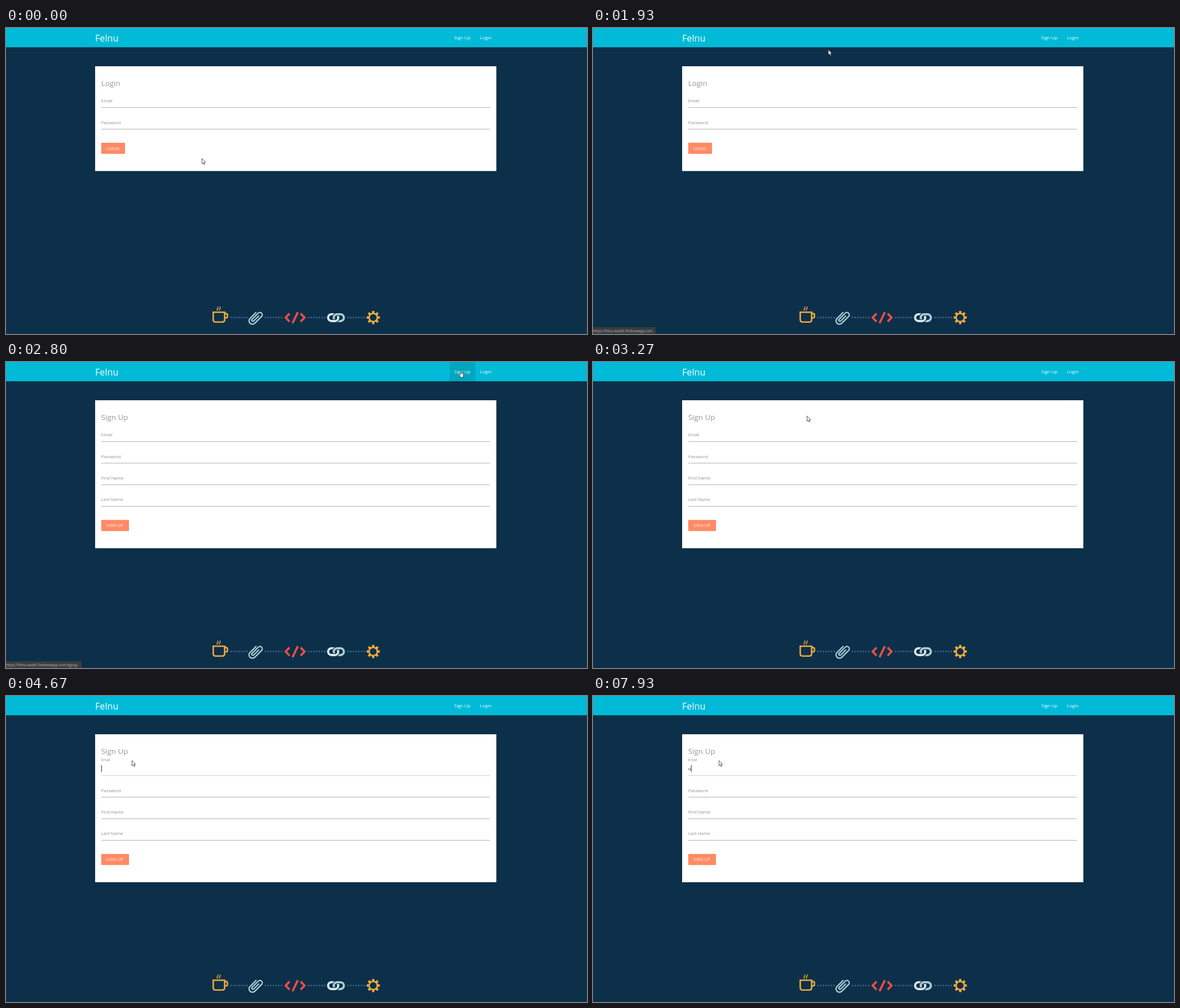
An HTML page that plays this animation: 1030 by 544 pixels, repeating every 8 s.

```html
<!DOCTYPE html>
<html lang="en">
<head>
<meta charset="utf-8">
<title>Felnu</title>
<style>
  html, body { margin: 0; width: 100%; height: 100%; overflow: hidden; background: #0c304a; }
  svg { display: block; width: 100vw; height: 100vh; font-family: "Open Sans", "Noto Sans", sans-serif; }
  .raised { filter: drop-shadow(0 .8px 1px rgba(0, 0, 0, .25)); }
  .nav { fill: #fff; font-size: 8px; font-weight: 500; }
  .title { fill: #979797; font-size: 13.4px; }
  .label { fill: #8f8f8f; font-size: 7.8px; }
  .btn { fill: #fff; font-size: 7.25px; font-weight: 500; letter-spacing: .27px; }
  .rule { stroke: #a6a6a6; stroke-width: .9; }
  .line { fill: none; stroke-width: 2.6; }
  .bold { stroke-width: 3.8; }
  .gap { stroke: #0c304a; stroke-width: 6.4; }
</style>
</head>
<body>
<svg viewBox="0 0 1030 544" preserveAspectRatio="none">
  <rect width="1030" height="544" fill="#0c304a"/>
  <rect class="raised" width="1030" height="34.3" fill="#00bad8"/>
  <rect id="hover" x="786.5" width="45.5" height="34.3" opacity="0"/>
  <text x="158" y="23.6" fill="#fff" font-size="16.2">Felnu</text>
  <text class="nav" x="794.8" y="20">Sign Up</text>
  <text class="nav" x="840.6" y="20">Login</text>

  <rect id="card" class="raised" x="158" y="68" width="711.3" fill="#fff"/>
  <text id="title" class="title" x="168.7" y="103.4"></text>
  <g id="fields"></g>
  <g id="button">
    <rect id="face" x="168.8" height="19.7" y="204" rx="1" fill="#ff8a65"/>
    <text id="action" class="btn" x="177.8" y="216.7"></text>
  </g>
  <text id="typed" x="168.7" y="132.2" font-size="7.9" fill="#222">u</text>
  <rect id="caret" y="123" width="1" height="12" fill="#222"/>

  <g id="dots" fill="#3f6389"></g>
  <g class="line" stroke="#f1aa3e">
    <path d="M367.4 505.3H387.6V518.5Q387.6 522.8 383.2 522.8H371.8Q367.4 522.8 367.4 518.5Z"/>
    <path d="M388 507.6H390Q392.6 507.6 392.6 510.4V512.4Q392.6 515.3 390 515.3H388"/>
    <path d="M375 502.5q-2-2 0-3.6t0-3.6M379 502.5q-2-2 0-3.6t0-3.6" style="stroke-width:1.4"/>
  </g>
  <path class="line" stroke="#a9d0d6" style="stroke-width:2.3" stroke-linecap="round" transform="translate(442.5 515) rotate(45)"
    d="M-6 -7V8A6 6 0 0 0 6 8V-9A4.2 4.2 0 0 0 -2.4 -9V6.4A2.1 2.1 0 0 0 1.8 6.4V-6"/>
  <path class="line bold" stroke="#ea4f46"
    d="M502.6 507.6L495.8 514.8L502.6 522M517.4 505.2L508 524.8M522.4 507.6L529.2 514.8L522.4 522"/>
  <g class="line bold">
    <rect x="571" y="508.8" width="18" height="12.2" rx="6.1" stroke="#dce8ee"/>
    <path class="gap" d="M581 514.9A6.1 6.1 0 0 1 587 508.8H590"/>
    <rect x="581" y="508.8" width="18" height="12.2" rx="6.1" stroke="#a9cdd6"/>
    <path class="gap" d="M589 514.9A6.1 6.1 0 0 1 583 521H580"/>
    <path d="M589 513.5V514.9A6.1 6.1 0 0 1 583 521H577" stroke="#dce8ee"/>
  </g>
  <g id="gear" transform="translate(651 514.7)" fill="#f1aa3e">
    <circle class="line" r="7.3" stroke="#f1aa3e"/>
  </g>

  <g id="status">
    <rect id="bar" y="532" height="12" fill="#3a3c3f"/>
    <text id="url" x="0" y="540.8" font-size="6.2" fill="#b4b6b8"></text>
  </g>

  <g id="pointer" stroke="#222" stroke-width=".75" stroke-linejoin="round" fill="#fff">
    <path id="arrow" d="M.3 .4V9.8L2.4 7.9L3.9 11.3L5.4 10.6L4 7.4H6.8Z"/>
    <path id="hand" d="M-.9 .9Q0 -.5 .9 .9V4.2L3.8 4.9Q4.7 5.3 4.6 6.5L3.8 9.6V11.5H-.9V10.2L-3 7.3Q-3.2 6 -2 6.1L-.9 7.1Z"/>
    <path id="beam" d="M-2 -4.3H2M0 -4.3V4.3M-2 4.3H2" stroke-width=".9"/>
  </g>
</svg>
<script>
const LOOP = 8000, STEP = 200 / 3, FADE = 270, BLINK = 1600 / 3;
const SWITCH = 2790, FOCUS = 3595, TYPED = 7925;
const HOST = "https://felnu-eade0.firebaseapp.com";
const ROW = 38.4;
const $ = id => document.getElementById(id);
const clamp = v => Math.max(0, Math.min(1, v));
const smooth = k => k * k * (3 - 2 * k);
const mix = (a, b, k) => a + (b - a) * k;
const set = (el, attrs) => { for (const k in attrs) el.setAttribute(k, attrs[k]); };
const show = (el, on) => set(el, { display: on ? "inline" : "none" });

function add(parent, tag, attrs, text = "") {
  const el = document.createElementNS("http://www.w3.org/2000/svg", tag);
  set(el, attrs);
  el.textContent = text;
  return $(parent).appendChild(el);
}

const rows = ["Email", "Password", "First Name", "Last Name"].map((name, i) => ({
  label: add("fields", "text", { class: "label", x: 168.8, y: 132.2 + ROW * i }, name),
  rule: add("fields", "path", { class: "rule", d: `M169 ${141.4 + ROW * i}H858` })
}));

for (const x of [399, 460, 536.5, 606.5])
  for (let i = 0; i < 7; i++) add("dots", "circle", { cx: x + 4.75 * i, cy: 514.8, r: 1.45 });
for (let i = 0; i < 8; i++)
  add("gear", "rect", { x: -2.1, y: -11.7, width: 4.2, height: 4, rx: .6, transform: `rotate(${45 * i})` });

// Where the mouse pauses or turns; it eases from stop to stop.
const stops = [
  { t: 0, x: 347, y: 231.5 },
  { t: 300, x: 219, y: 150 },
  { t: 750, x: 886, y: 52 },
  { t: 930, x: 794, y: 24 },
  { t: 1330, x: 105, y: 44 },
  { t: 1530, x: 182, y: 18 },
  { t: 1930, x: 416.5, y: 38 },
  { t: 2130, x: 817, y: 15 },
  { t: 2530, x: 806.5, y: 16 },
  { t: 2800, x: 806.5, y: 16 },
  { t: 3530, x: 199, y: 129 },
  { t: 3730, x: 199, y: 129 },
  { t: 4130, x: 223, y: 114.3 }
];

function pointerAt(t) {
  const i = stops.findIndex(s => s.t > t);
  if (i < 0) return stops[stops.length - 1];
  const a = stops[i - 1], b = stops[i];
  const k = smooth((t - a.t) / (b.t - a.t));
  return { x: mix(a.x, b.x, k), y: mix(a.y, b.y, k) };
}

function shapeAt({ x, y }, count) {
  const onLink = x > 786 && x < 869 || x > 158 && x < 198;
  if (y < 34 && onLink) return "hand";
  const row = (y - 118) / ROW;
  const onField = x > 169 && x < 858 && row >= 0 && row < count && row % 1 < .62;
  return onField ? "beam" : "arrow";
}

const pulse = (t, on, off) => Math.min(clamp((t - on) / FADE), clamp((off + FADE - t) / FADE));

function render(ms) {
  const t = Math.floor((ms + 5) / STEP) * STEP;
  const signup = t >= SWITCH, focused = t >= FOCUS, typed = t >= TYPED;
  const count = signup ? 4 : 2;
  const name = signup ? "Sign Up" : "Login";

  set($("card"), { height: 109.5 + ROW * count });
  $("title").textContent = name;
  $("action").textContent = name.toUpperCase();
  set($("face"), { width: signup ? 49.2 : 42.2 });
  set($("button"), { transform: `translate(0 ${ROW * (count - 2)})` });
  rows.forEach(({ label, rule }, i) => {
    show(label, i < count);
    show(rule, i < count);
  });

  const lift = 1 - (1 - clamp((t - FOCUS) / 220)) ** 2;
  const email = rows[0];
  set(email.label, { y: 132.2 - 15.9 * lift });
  email.label.style.fontSize = 7.8 - 1.5 * lift + "px";
  email.rule.style.stroke = focused ? "#c8c8c8" : "";

  show($("typed"), typed);
  show($("caret"), typed || focused && Math.floor((t - FOCUS) / BLINK) % 2 === 0);
  set($("caret"), { x: typed ? 173.7 : 168.8 });

  set($("hover"), { opacity: .11 * (pulse(t, 870, 900) + pulse(t, 2000, 2860)) });

  const onSignup = t >= 2060;
  show($("status"), t >= 1590 && t < 3060);
  $("url").textContent = HOST + (onSignup ? "/signup" : "");
  set($("bar"), { width: onSignup ? 134 : 111 });

  const at = pointerAt(t);
  const shape = shapeAt(at, count);
  for (const id of ["arrow", "hand", "beam"]) show($(id), id === shape);
  set($("pointer"), { transform: `translate(${at.x} ${at.y})` });
}

const start = performance.now();
function tick() {
  render((performance.now() - start) % LOOP);
  requestAnimationFrame(tick);
}
tick();
</script>
</body>
</html>
```
